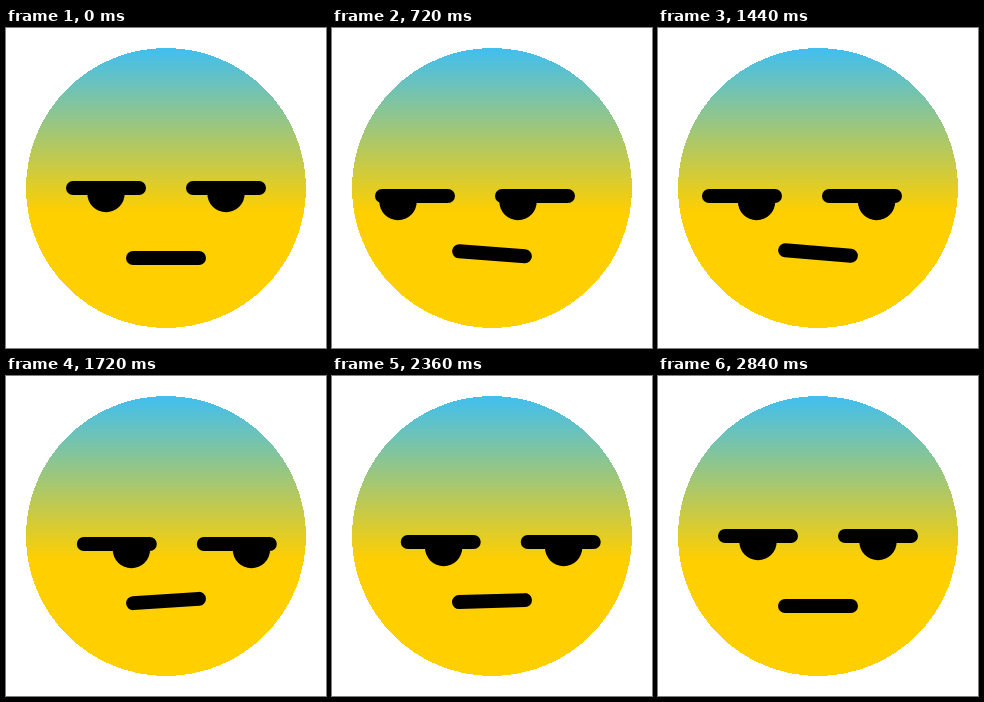
An HTML page for the animation above (2880 ms loop, 320 by 320 pixels).

```html
<!DOCTYPE html>
<html lang="en">
<head>
<meta charset="utf-8">
<title>Side-eye face</title>
<style>
  html, body { margin: 0; width: 100%; height: 100%; overflow: hidden; background: #fff; }
  svg { display: block; width: 100%; height: 100%; }
  .bar { stroke: #000; stroke-width: 14; stroke-linecap: round; }
</style>
</head>
<body>
<svg viewBox="0 0 320 320">
  <defs>
    <linearGradient id="skin" x1="0" y1="0" x2="0" y2="1">
      <stop offset="0.012" stop-color="#44bfec"/>
      <stop offset="0.586" stop-color="#ffcf00"/>
    </linearGradient>
    <path id="pupil" d="M81.3 165.5a18.7 18.7 0 0 0 37.4 0z"/>
  </defs>
  <circle cx="160" cy="160" r="140" fill="url(#skin)" shape-rendering="crispEdges"/>
  <g id="eyes">
    <path class="bar" d="M67 160h66m54 0h66"/>
    <g id="pupils">
      <use href="#pupil"/>
      <use href="#pupil" x="120"/>
    </g>
  </g>
  <path id="mouth" class="bar" d="M-33 0h66"/>
</svg>
<script>
  const LOOP = 2880, STEP = 40;
  const [eyes, pupils, mouth] = ['eyes', 'pupils', 'mouth'].map(id => document.getElementById(id));

  // Smooth progress from 0 to 1 between two times.
  function ease(t, from, to) {
    const u = Math.min(1, Math.max(0, (t - from) / (to - from)));
    return u * u * (3 - 2 * u);
  }

  function render(t) {
    // Eyes: drop to the left, swing to the right, come back.
    const drop = ease(t, 0, 520), swing = ease(t, 1400, 1760), back = ease(t, 2240, 2600);
    const eyeX = -17 * drop + 28.8 * swing - 11.8 * back;
    const eyeY = 8 * (drop - back);

    // Pupils look left, then right, then ahead, relative to the lids.
    const gaze = -17 * ease(t, 0, 740) + 31.6 * ease(t, 740, 1240) - 14.6 * ease(t, 1760, 2600);

    // Mouth rises and tilts, flips its tilt with the swing, then relaxes.
    const rise = ease(t, 0, 960);
    const mouthY = 230 - 5 * (rise - ease(t, 2320, 2840));
    const tilt = 5 * rise - 9 * swing + 4 * ease(t, 1760, 2840);

    eyes.setAttribute('transform', `translate(${eyeX} ${eyeY})`);
    pupils.setAttribute('transform', `translate(${gaze} 0)`);
    mouth.setAttribute('transform', `translate(160 ${mouthY}) rotate(${tilt})`);
  }

  let start;
  function tick(now) {
    start ??= now;
    render(Math.floor((now - start) % LOOP / STEP) * STEP);
    requestAnimationFrame(tick);
  }
  render(0);
  requestAnimationFrame(tick);
</script>
</body>
</html>
```
